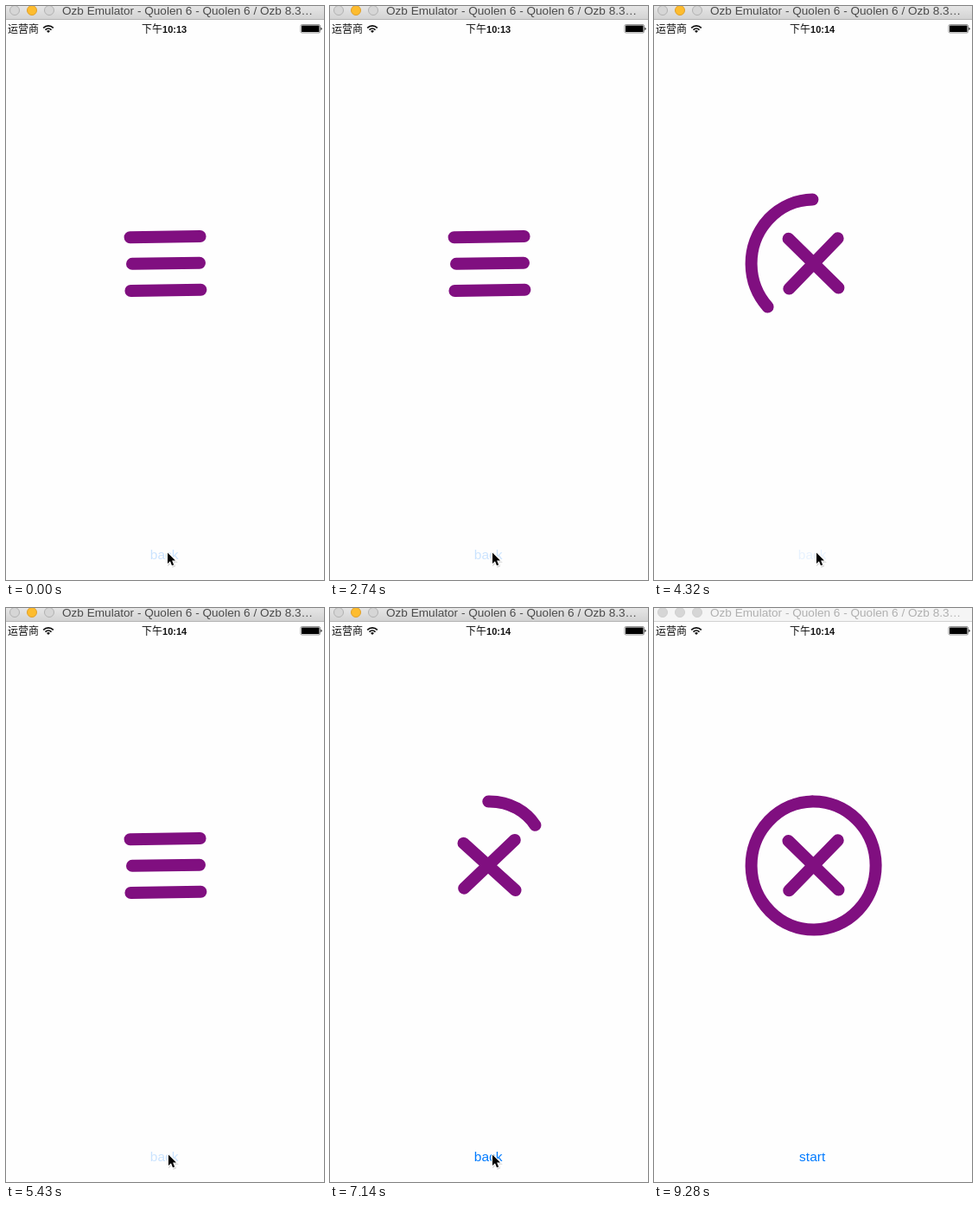
Write an HTML page that moves like this. It is 368 px wide and 663 px high and loops after 9.35 s.

```html
<!DOCTYPE html>
<html lang="zh">
<head>
<meta charset="utf-8">
<style>
  html, body { margin: 0; width: 100%; height: 100%; overflow: hidden; background: #fefefe; }
  svg { display: block; width: 368px; height: 663px; }
  text { font-family: "Liberation Sans", "Noto Sans CJK SC", "Noto Sans CJK", sans-serif; }
  .icon { fill: none; stroke: #800f80; stroke-width: 14; stroke-linecap: round; }
</style>
</head>
<body>
<svg viewBox="0 0 368 663">
  <defs>
    <linearGradient id="chrome" x2="0" y2="1">
      <stop offset="0" stop-color="#e6e6e6"/><stop offset="1" stop-color="#d3d3d3"/>
    </linearGradient>
  </defs>
  <rect width="368" height="663" fill="#fefefe"/>

  <rect id="bar" width="368" height="15"/>
  <rect id="edge" y="15" width="368" height="1"/>
  <g id="lights" stroke-width="1">
    <circle cx="10" cy="5" r="5.5"/><circle cx="30" cy="5" r="5.5"/><circle cx="50" cy="5" r="5.5"/>
  </g>
  <text id="title" x="65" y="10" font-size="13.6">Ozb Emulator - Quolen 6 - Quolen 6 / Ozb 8.3…</text>

  <text x="2" y="31" font-size="12" fill="#111">运营商</text>
  <g transform="translate(49 30.5)" fill="none" stroke="#111" stroke-width="1.7">
    <path d="M-5.8 -5.2A8.2 8.2 0 0 1 5.8 -5.2M-3.5 -2.9A5 5 0 0 1 3.5 -2.9"/>
    <path d="M0 .4L-2 -1.6A2.8 2.8 0 0 1 2 -1.6Z" fill="#111" stroke="none"/>
  </g>
  <text x="157" y="30.5" font-size="12" fill="#111" font-weight="500">下午<tspan id="clock" font-size="11" font-weight="700"></tspan></text>
  <rect x="341" y="21.5" width="22.5" height="9.5" rx="1.5" fill="#fff" stroke="#777" stroke-width=".8"/>
  <rect x="342" y="22.5" width="20.5" height="7.5" rx=".5"/>
  <path d="M364.4 24.5a2 2 0 0 1 0 3.6z"/>

  <g class="icon" transform="rotate(-.75 184.5 297.3)">
    <path id="ring"/>
    <path id="top" d="M-40.5 0H40.5"/>
    <path id="bottom" d="M-40.5 0H40.5"/>
  </g>

  <text id="label" x="183.2" y="638.5" font-size="15.5" text-anchor="middle" fill="#007aff"></text>
  <g id="cursor">
    <path d="M1 1.5V14L4 11.3 6 16.3 8.2 15.4 6.1 10.5H10Z" fill="#000" opacity=".15" stroke="#000" stroke-width="1.5"/>
    <path d="M0 0V12.5L3 9.8 5 14.8 7.2 13.9 5.1 9H9Z" stroke="#fff" stroke-width="2" paint-order="stroke"/>
  </g>
</svg>
<script>
const LOOP = 9350;
const $ = id => document.getElementById(id);
const set = (el, attrs) => { for (const k in attrs) el.setAttribute(k, attrs[k]); };
const clamp = v => Math.max(0, Math.min(1, v));
const mix = (a, b, p) => a + (b - a) * p;

// Each tap toggles the icon: when the button is pressed, and when it reacts.
const taps = [
  { press: -120, react: 30, open: true },
  { press: 1500, react: 1620, open: false },
  { press: 2740, react: 2890, open: true },
  { press: 4010, react: 4160, open: false },
  { press: 5430, react: 5580, open: true },
  { press: 6690, react: 6840, open: false },
  { press: 7780, react: 7960, open: true }
];

function bezier(x1, y1, x2, y2) {
  const at = (a, b, s) => 3 * a * s * (1 - s) ** 2 + 3 * b * s * s * (1 - s) + s ** 3;
  return x => {
    if (x <= 0) return 0;
    if (x >= 1) return 1;
    let lo = 0, hi = 1;
    for (let i = 0; i < 26; i++) {
      const mid = (lo + hi) / 2;
      if (at(x1, x2, mid) < x) lo = mid; else hi = mid;
    }
    return at(y1, y2, lo);
  };
}
const swing = bezier(.5, -.8, .5, 1.85);
const windUp = bezier(.25, -.4, .5, 1);
const unwindHead = bezier(.25, .3, .5, .9);
const unwindTail = bezier(.25, 0, .5, 1.2);

// Middle bar, lead-in curve, full ring, then a quarter of overlap.
const ring = $('ring');
const lead = 'M146 297.3H224C266 297.3 245 223.5 184.6 223.5';
set(ring, { d: lead });
const ringStart = ring.getTotalLength();
set(ring, { d: lead + 'a72 74 0 0 0 0 148a72 74 0 0 0 0 -148a72 74 0 0 0 -72 74' });
const total = ring.getTotalLength();
const barEnd = 78;

function drawIcon(tap, t) {
  let tail, head, cross;
  if (tap.open) {
    const d = t - tap.react - 10;
    tail = windUp(d / 500);
    head = windUp(d / 1020);
    cross = swing((d - 250) / 400);
  } else {
    const d = t - tap.react + 90;
    tail = 1 - unwindTail((d - 259) / 500);
    head = 1 - unwindHead(d / 610);
    cross = 1 - swing((d - 250) / 400);
  }
  const from = Math.max(0, ringStart * tail);
  const to = Math.min(total, mix(barEnd, total, head));
  set(ring, {
    'stroke-dasharray': `${Math.max(.1, to - from)} ${total * 2}`,
    'stroke-dashoffset': -from
  });
  const place = (id, y, angle) => set($(id), {
    transform: `translate(184.5 ${mix(y, 297.3, cross)}) rotate(${angle * cross})`
  });
  place('top', 266.6, -45);
  place('bottom', 328.4, 45);
}

function drawLabel(tap, t) {
  const names = tap.open ? ['back', 'start'] : ['start', 'back'];
  const d = t - tap.react;
  const swapped = d >= 100;
  $('label').textContent = names[+swapped];
  set($('label'), { opacity: swapped ? clamp((d - 150) / 130) : .2 * (1 - clamp(d / 100)) });
}

function drawChrome(active) {
  set($('bar'), { fill: active ? 'url(#chrome)' : '#f5f5f5' });
  set($('edge'), { fill: active ? '#b4b4b4' : '#d2d2d2' });
  set($('title'), { fill: active ? '#4b4b4b' : '#b0b0b0' });
  [...$('lights').children].forEach((light, i) => set(light, active && i === 1
    ? { fill: '#fdbc2e', stroke: '#e0a02a' }
    : { fill: '#d6d6d6', stroke: active ? '#b2b2b2' : '#cfcfcf' }));
}

function drawCursor(t) {
  const p = clamp((t - 8420) / 290) ** 2;
  const x = mix(t < 1440 ? 187 : 188, 273, p);
  set($('cursor'), { transform: `translate(${x} ${mix(631.5, 667, p)})` });
}

function render(t) {
  const pressed = taps.filter(tap => tap.press <= t).pop();
  drawIcon(pressed, t);
  drawLabel(pressed, t);
  $('clock').textContent = t < 3920 ? '10:13' : '10:14';
  drawChrome(t < 9280);
  drawCursor(t);
}

const begin = performance.now();
function tick() {
  render(Math.max(0, performance.now() - begin) % LOOP);
  requestAnimationFrame(tick);
}
tick();
</script>
</body>
</html>
```
